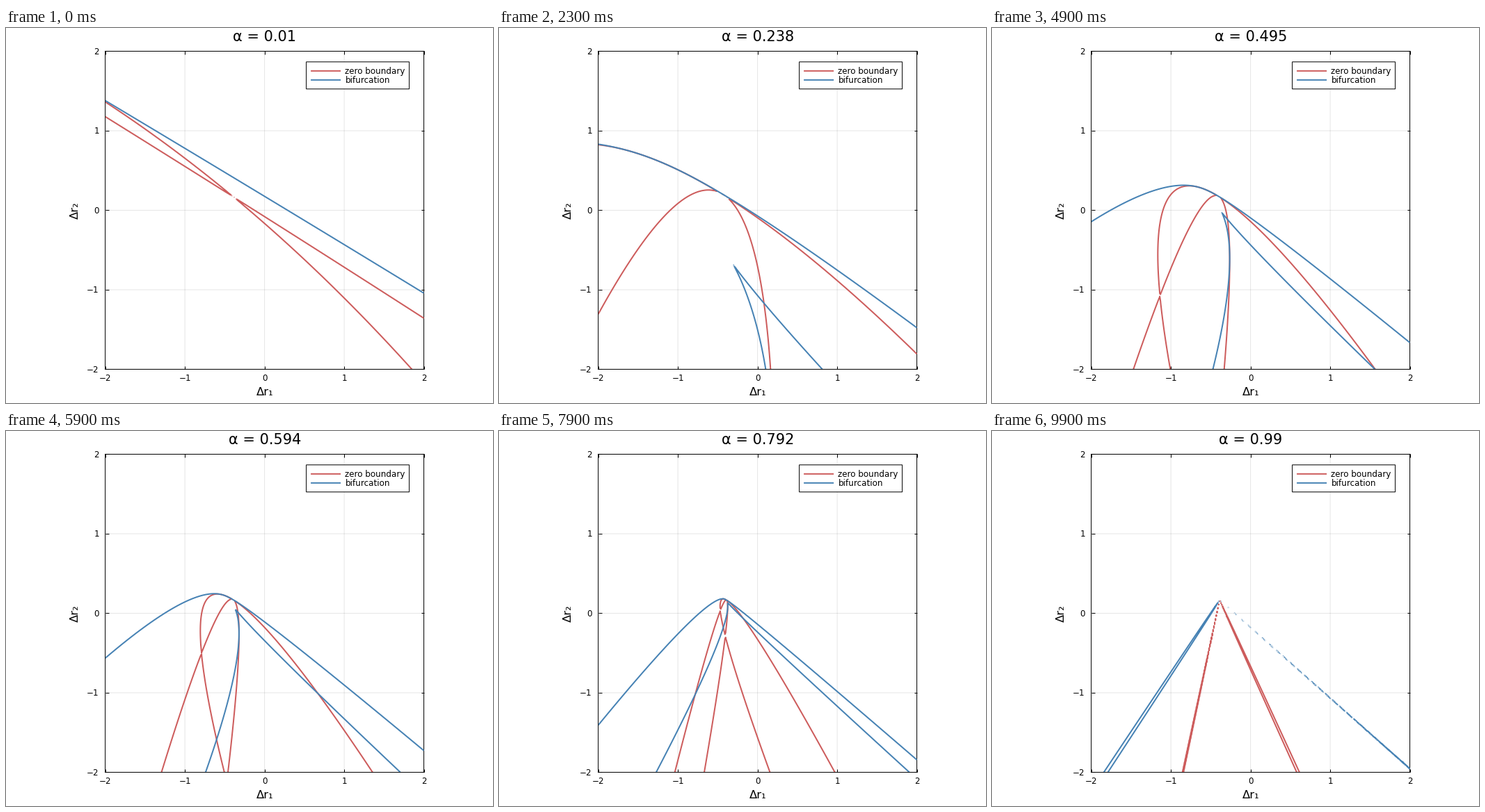
Recreate the animation shown at these times as a matplotlib script. Size 700 by 540 pixels, loop 10 s.

```python
import numpy as np
import matplotlib.pyplot as plt
from matplotlib.animation import FuncAnimation
from matplotlib.patches import Rectangle

W, H, DPI = 700, 540, 100
STEPS, INTERVAL = 100, 100
LEFT, TOP, SIDE = 142.6, 33.45, 458
RED, BLUE = "indianred", "steelblue"
PX = 72 / DPI

# r = apex + (1-a) * (L1 u + L2 v) + a * (Q1 u^2 + Q2 v^2 + C u v)
APEX = np.array([-0.388, 0.166])
L1, Q1 = np.array([-0.4564, 0.380]), np.array([-0.2124, -1.0])
L2, Q2 = np.array([-1.6557, 1.046]), np.array([0.4548, -1.0])
C = np.array([-1.590, -0.2712])

axis = np.linspace(-2, 2, 401)
X, Y = np.meshgrid(axis, axis)


def cross(a, b):
    return a[0] * b[1] - a[1] * b[0]


def parabola(lin, quad, q):
    """Zero where q = lin t + quad t^2 for some t."""
    return cross(quad, q) ** 2 - cross(lin, quad) * cross(lin, q)


def pencil():
    """Parts of det(conic_x + k conic_y) that do not depend on q."""
    P, R, T, S, U = (np.poly1d(v[::-1]) for v in (Q1, C / 2, Q2, L1 / 2, L2 / 2))
    minor = P * T - R * R
    rest = 2 * R * S * U - P * U * U - T * S * S
    return minor.coeffs, rest.coeffs


MINOR, REST = pencil()


def discriminant(q):
    """Zero where the two conics touch, i.e. two equilibria merge."""
    x, y = q
    m2, m1, m0 = MINOR
    a = REST[0] - m2 * y
    b = REST[1] - m2 * x - m1 * y
    c = REST[2] - m1 * x - m0 * y
    d = REST[3] - m0 * x
    return (18 * a * b * c * d - 4 * b**3 * d + b * b * c * c
            - 4 * a * c**3 - 27 * a * a * d * d)


fig = plt.figure(figsize=(W / DPI, H / DPI), dpi=DPI, facecolor="white")
ax = fig.add_axes([LEFT / W, 1 - (TOP + SIDE) / H, SIDE / W, SIDE / H])
ax.set(xlim=(-2, 2), ylim=(-2, 2), xticks=range(-2, 3), yticks=range(-2, 3))
ax.set_axisbelow(True)
ax.grid(color="black", alpha=0.1, linewidth=PX, snap=False)
ax.tick_params(direction="in", length=4.5 * PX, width=PX, top=True, right=True,
               labelbottom=False, labelleft=False)
for spine in ax.spines.values():
    spine.set(linewidth=PX, snap=False, zorder=1)

# Overlay measured in pixels, origin at the top left
page = fig.add_axes([0, 0, 1, 1], zorder=5)
page.set(xlim=(0, W), ylim=(H, 0))
page.axis("off")


def label(x, y, text, size=11.9, ha="center", **kw):
    return page.text(x, y, text, fontsize=size * PX, family="DejaVu Sans",
                     ha=ha, va="baseline", **kw)


for n in range(-2, 3):
    name = str(n).replace("-", "\u2212")
    offset = (n + 2) * SIDE / 4
    label(LEFT + offset, 507.7, name)
    label(133.8, TOP + SIDE - offset + 4.3, name, ha="right")

label(372, 529, "Δr₁", 16.35)
label(104, 262.4, "Δr₂", 16.35, rotation=90, rotation_mode="anchor")
title = label(372, 18.8, "", 20.9)

page.add_patch(Rectangle((431.6, 48.8), 148, 39, facecolor="white",
                         edgecolor="black", linewidth=PX, snap=False))
for y, color, name in ((61.8, RED, "zero boundary"), (74.8, BLUE, "bifurcation")):
    page.plot([438.1, 481.1], [y, y], color=color, linewidth=2 * PX,
              solid_capstyle="butt", snap=False)
    label(487.4, y + 4.3, name, ha="left")

curves = []


def draw(i):
    alpha = 0.01 + 0.98 * i / (STEPS - 1)
    scale = (1 - alpha) ** 2 / alpha
    q = (X - APEX[0]) / scale, (Y - APEX[1]) / scale
    while curves:
        curves.pop().remove()
    zero = parabola(L1, Q1, q) * parabola(L2, Q2, q)
    for z, color in ((zero, RED), (discriminant(q), BLUE)):
        curves.append(ax.contour(X, Y, z, levels=[0], colors=color,
                                 linewidths=2 * PX, linestyles="solid"))
    title.set_text(f"α = {round(alpha, 3)}")
    return [title]


anim = FuncAnimation(fig, draw, frames=STEPS, interval=INTERVAL,
                     repeat=True, repeat_delay=0, blit=False)
plt.show()
```
